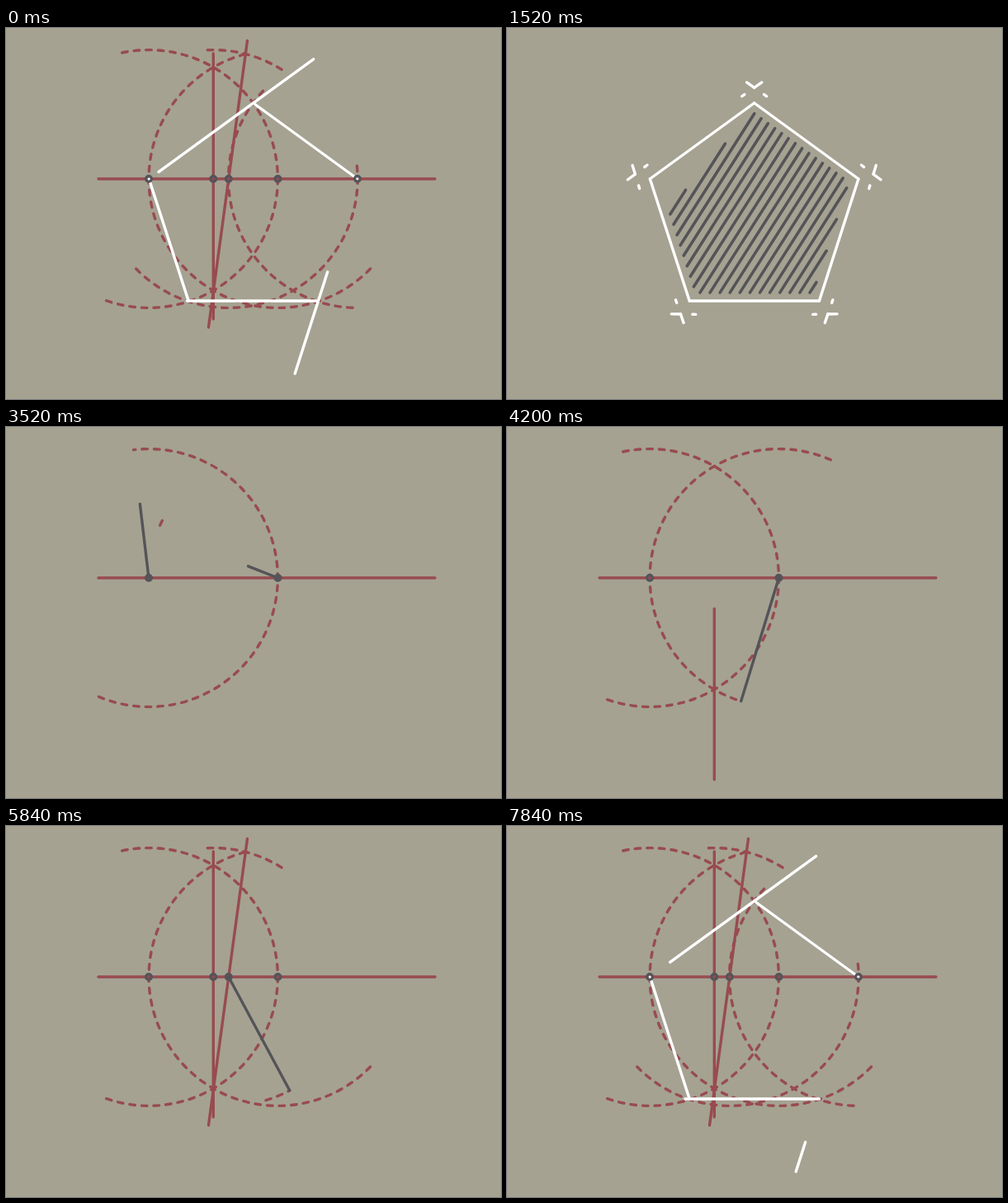
An HTML page with a canvas that plays this animation: 600 by 450 pixels, repeating every 7.88 s.

```html
<!DOCTYPE html>
<html lang="en">
<head>
<meta charset="utf-8">
<title>Pentagon construction</title>
<style>
html, body { margin: 0; width: 100%; height: 100%; overflow: hidden; background: #a5a292; }
canvas { display: block; width: 600px; height: 450px; }
</style>
</head>
<body>
<canvas id="stage" width="600" height="450"></canvas>
<script>
(() => {
const ctx = document.getElementById('stage').getContext('2d');
const LOOP = 7880, BASE = 183, R = 156.4, LEAD = 92.6;
const RED = '#984b50', GREY = '#545458', WHITE = '#fff';
const rad = Math.PI / 180;

const clamp = v => Math.max(0, Math.min(1, v));
const mix = (a, b, p) => a + (b - a) * p;
const span = (t, start, len) => clamp((t - start) / len);
const sine = p => (1 - Math.cos(Math.PI * p)) / 2;

// Cubic bezier (.48, 0, .065, 1): quick launch, long settling
function snap(x) {
  if (x <= 0 || x >= 1) return clamp(x);
  let lo = 0, hi = 1;
  for (let i = 0; i < 24; i++) {
    const s = (lo + hi) / 2, q = 1 - s;
    if (1.44 * s * q * q + 0.195 * s * s * q + s * s * s < x) lo = s; else hi = s;
  }
  return lo * lo * (3 - 2 * lo);
}

// Circle sweeps: centre x, start time, duration, start angle,
// final head angle, final tail angle, tail lag
const sweeps = [
  [173, 2700, 900, 300, -104.4, 109.2, 0.47],
  [329.5, 3427, 1000, 213, -317, -104.7, 0.6],
  [251.3, 4463, 700, 210, -93, -58, 0.82],
  [269.8, 5453, 1147, 210, -367.4, -224.2, 0.693],
  [426, 6650, 1040, 210, -269.3, -137, 0.684]
];

// Guide lines: ends, start time, lead-in, tail delay, exit time
const guides = [
  [112, BASE, 520, BASE, 2360, LEAD, 200, 8260],
  [251.3, 353, 251.3, 31, 4080, 74.5, 200, 8160],
  [245.5, 363, 292.5, 15.5, 4960, 34.6, 60, 8200]
];

// Ring markers: x, time of appearance
const rings = [[173, 2560], [329.5, 3280], [251.3, 4380], [269.8, 5300], [426, 6440]];

// Pentagon corners, clockwise from the apex
const corners = [[299.7, 91], [426, BASE], [378.5, 331], [221.2, 331], [173.3, BASE]];

// Sides: first corner, second corner, start time
const sides = [[4, 3, 7040], [1, 0, 7280], [3, 2, 7400], [0, 4, 7640], [2, 1, 7760]];

function pen(color, width) {
  ctx.strokeStyle = color;
  ctx.lineWidth = width;
}

// Part of a line between two distances from its first end
function part(x1, y1, x2, y2, from, to) {
  if (to - from < 0.5) return;
  const d = Math.hypot(x2 - x1, y2 - y1), dx = (x2 - x1) / d, dy = (y2 - y1) / d;
  ctx.beginPath();
  ctx.moveTo(x1 + dx * from, y1 + dy * from);
  ctx.lineTo(x1 + dx * to, y1 + dy * to);
  ctx.stroke();
}

function slide(x1, y1, x2, y2, t, start, lead, delay, exit) {
  const d = Math.hypot(x2 - x1, y2 - y1);
  const head = mix(-lead, d, snap(span(t, start, 360)));
  let tail = mix(-lead, 0, snap(span(t, start + delay, 360)));
  tail = mix(tail, d, snap(span(t, exit, 400)));
  part(x1, y1, x2, y2, tail, head);
}

function sweepState(t, s) {
  const [, start, len, from, end, tailEnd, lag] = s;
  const head = mix(from, end, sine(span(t, start, len)));
  return { head, tail: tailEnd + lag * (head - end) };
}

function drawArc(t, s, i) {
  if (t < s[1]) return;
  const { head, tail } = sweepState(t, s);
  const cut = mix(tail, head, snap(span(t, 8080 + i * 40, 400)));
  if (cut - head < 0.3) return;
  ctx.setLineDash([6.6, 8]);
  ctx.beginPath();
  ctx.arc(s[0], BASE, R, cut * rad, head * rad, true);
  ctx.stroke();
  ctx.setLineDash([]);
}

function drawNeedle(t, s) {
  const [x, start, len] = s;
  const size = R * (snap(span(t, start, 360)) - snap(span(t, start + len - 190, 360)));
  const a = sweepState(t, s).head * rad;
  part(x, BASE, x + Math.cos(a), BASE + Math.sin(a), 0, size);
}

function drawRing(t, [x, start], i) {
  const p = span(t, start, 240);
  const scale = (p + 0.7 * Math.sin(Math.PI * p)) * (1 - snap(span(t, 8300 + i * 40, 240)));
  if (scale < 0.02) return;
  pen(GREY, 3.2 * scale);
  ctx.beginPath();
  ctx.arc(x, BASE, 3.4 * scale, 0, 7);
  ctx.stroke();
}

// Hatching fills the pentagon shrunk towards its centre
const inner = corners.map(([x, y]) => [mix(299.7, x, 0.905), mix(224.5, y, 0.905)]);

function chord(x0) {
  const slope = 0.638, hits = [];
  inner.forEach(([x1, y1], i) => {
    const [x2, y2] = inner[(i + 1) % 5];
    const f1 = x1 + (y1 - 321) * slope - x0, f2 = x2 + (y2 - 321) * slope - x0;
    if (f1 * f2 < 0) {
      const k = f1 / (f1 - f2);
      hits.push([mix(x1, x2, k), mix(y1, y2, k)]);
    }
  });
  return hits.sort((a, b) => b[1] - a[1]);
}

function drawHatch(t) {
  if (t < 1000 || t > 2800) return;
  pen(GREY, 3.6);
  for (let i = 0; i < 23; i++) {
    const [a, b] = chord(367 - i * 12.1);
    if (!b) continue;
    const d = Math.hypot(b[0] - a[0], b[1] - a[1]);
    part(...a, ...b, d * snap(span(t, 2160 + i * 8, 300)), d * span(t, 1010 + i * 26, 52));
  }
}

function drawSparks(t) {
  const p = snap(span(t, 1240, 280)), q = snap(span(t, 1620, 300));
  if (p <= q) return;
  pen(WHITE, 3.4);
  for (let i = 0; i < 5; i++) {
    ctx.save();
    ctx.translate(299.7, 224.2);
    ctx.rotate(i * 72 * rad);
    for (const side of [-1, 1]) {
      part(0, -151.8, side * 9.2, -158.3, 11.2 * q, 11.2 * p);
      part(side * 11.8, -143.6, side * 15, -141.4, 3.9 * q, 3.9 * p);
    }
    ctx.restore();
  }
}

function draw(t) {
  const u = t < 1000 ? t + LOOP : t;
  const w = t < 2800 ? t + LOOP : t;
  ctx.fillStyle = '#a5a292';
  ctx.fillRect(0, 0, 600, 450);
  ctx.lineCap = 'round';

  pen(RED, 3.4);
  sweeps.forEach((s, i) => drawArc(u, s, i));
  guides.forEach(([x1, y1, x2, y2, ...timing]) => slide(x1, y1, x2, y2, u, ...timing));

  drawHatch(t);
  pen(WHITE, 3.4);
  sides.forEach(([a, b, start], i) =>
    slide(...corners[a], ...corners[b], w, start, LEAD, 200, LOOP + 2160 + i * 40));
  drawSparks(t);

  pen(GREY, 3.4);
  sweeps.forEach(s => drawNeedle(u, s));
  rings.forEach((r, i) => drawRing(u, r, i));
}

const begin = performance.now();
function tick() {
  draw((performance.now() - begin) % LOOP);
  requestAnimationFrame(tick);
}
tick();
})();
</script>
</body>
</html>
```
